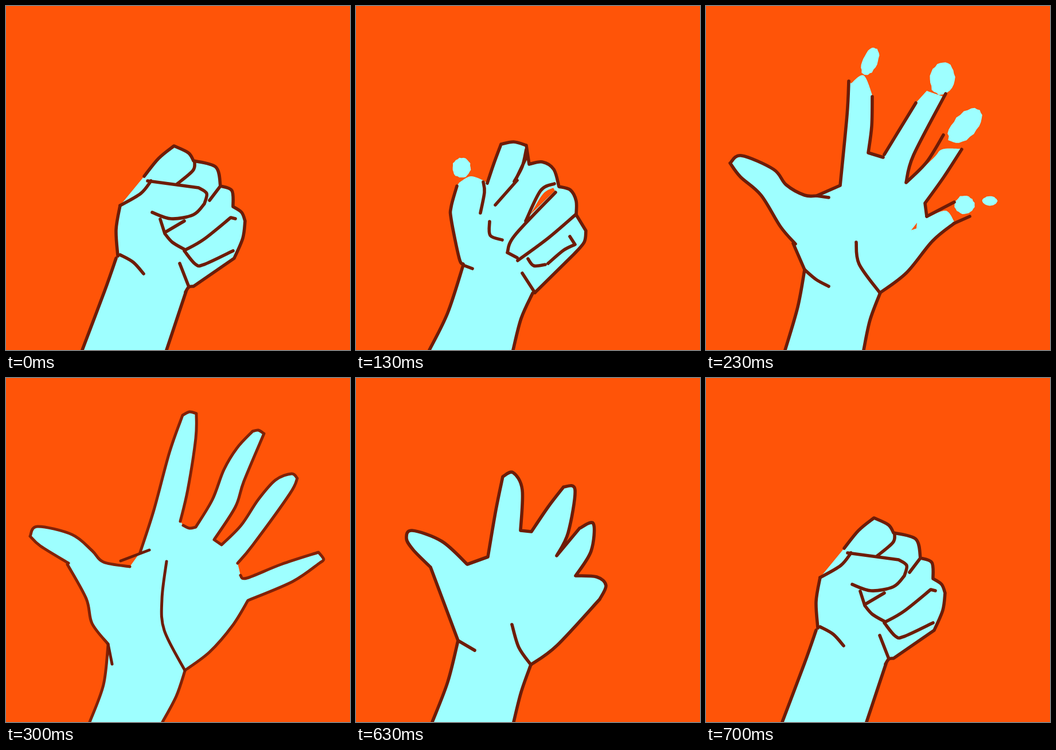
Recreate the animation shown at these times as an HTML page with a canvas. Size 600 by 600 pixels, loop 830 ms.

```html
<!DOCTYPE html>
<html lang="en">
<head>
<meta charset="utf-8">
<title>Opening hand</title>
<style>
  html, body { margin: 0; width: 100%; height: 100%; overflow: hidden; background: #ff5408; }
  canvas { display: block; width: 100vw; height: 100vh; }
</style>
</head>
<body>
<canvas id="stage" width="600" height="600"></canvas>
<script>
const ctx = document.getElementById('stage').getContext('2d');
const BACK = '#ff5408', SKIN = '#9effff', INK = '#6e1c07', SOFT_INK = '#822105';

// Adds a smooth curve through "x,y" points; "|" marks a sharp corner.
function addCurve(path, text, joined) {
  let last = null;
  for (const part of text.split('|')) {
    const pts = part.split(' ').map(p => p.split(',').map(Number));
    if (last) pts.unshift(last);
    else if (joined) path.lineTo(...pts[0]);
    else path.moveTo(...pts[0]);
    for (let i = 0; i < pts.length - 1; i++) {
      const a = pts[i], b = pts[i + 1];
      const before = pts[i - 1] || a, after = pts[i + 2] || b;
      path.bezierCurveTo(
        a[0] + (b[0] - before[0]) / 6, a[1] + (b[1] - before[1]) / 6,
        b[0] - (after[0] - a[0]) / 6, b[1] - (after[1] - a[1]) / 6,
        b[0], b[1]);
    }
    last = pts[pts.length - 1];
  }
}

function curves(list, joined) {
  const path = new Path2D();
  list.forEach((text, i) => addCurve(path, text, joined && i > 0));
  return path;
}

// A loose dab of skin colour with a slightly ragged rim.
function addDab(path, x, y, rx, ry, turn = 0) {
  let seed = x;
  const dab = new Path2D();
  for (let i = 0; i < 28; i++) {
    seed = (seed * 73 + 41) % 1009;
    const a = i / 28 * Math.PI * 2, r = 0.95 + seed / 1009 * 0.12;
    const u = Math.cos(a) * rx * r, v = Math.sin(a) * ry * r;
    dab.lineTo(x + u * Math.cos(turn) - v * Math.sin(turn),
               y + u * Math.sin(turn) + v * Math.cos(turn));
  }
  path.addPath(dab);
}

// The outline runs clockwise from the left of the arm and bounds the skin;
// "~" marks a stretch of it without ink.
function pose({ outline, creases, dabs = [], gap, ink = INK, width = 5.6 }) {
  const skin = curves(outline.map(s => s.replace('~', '')), true);
  dabs.forEach(d => addDab(skin, ...d));
  return {
    skin, ink, width,
    gap: curves(gap ? [gap] : []),
    outline: curves(outline.filter(s => s[0] !== '~')),
    creases: curves(creases)
  };
}

const fist = pose({
  outline: [
    '133,600 172,497 192,440', '195,436 192,390 199,348',
    '241,297 266,266 293,244|318,256 327,270|366,281 374,314|394,322 396,350|411,360 417,375|413,405 398,440|327,489|319,490 313,499',
    '314,498 300,540 280,600'
  ],
  creases: [
    '199,348 235,327 253,305', '247,305 336,317|350,327 346,345|327,364 288,371 255,360',
    '329,272 326,287 299,310', '374,314 355,339', '269,372 277,397|290,412 312,425',
    '277,395 311,375', '312,426 345,407 392,369|400,371', '311,427 330,450 345,451 396,427',
    '303,449 319,490', '199,434 222,447 240,467'
  ]
});

const loose = pose({
  outline: [
    '128,600 160,535 187,452', '187,450 180,440 166,372 166,350 176,314', '~180,308 200,297 222,304',
    '229,309 240,276 253,241|275,237 297,243|302,276|325,272 345,285 354,315|374,321 384,340 384,364|401,392|398,412 380,433|312,500',
    '308,501 288,545 274,600'
  ],
  creases: [
    '222,307 224,325 217,361', '297,250 290,280 276,306', '298,262 278,304', '281,304 243,347',
    '346,310 322,322 296,375', '348,325 277,400 264,430|281,439', '384,363 335,405 282,444',
    '373,402 382,416|362,426 335,449', '300,441 310,453 330,451', '233,376 234,400 255,408',
    '187,452 203,458', '290,466 312,500'
  ],
  dabs: [[184, 282, 16, 17]],
  gap: '344,317 326,328 304,364|347,322'
});

const half = pose({
  outline: [
    '133,600 160,530 178,458|130,330|100,300 88,280 98,266 150,285 194,325|230,312|244,230 256,172|274,165 290,195 287,266|306,268|335,225 362,190|382,195 370,270 350,310|390,262|414,254 410,302 383,345|420,347 436,362 425,386|350,467 305,500|288,548 275,600'
  ],
  creases: ['178,458 207,475', '272,430 284,470 305,500']
});

const spread = pose({
  outline: [
    '138,600 160,525 172,460|152,414',
    '156,415 130,385 96,330 60,298 42,274|62,261 118,285 140,312 172,330 193,331|234,313|246,190 249,131',
    '~253,135 275,121 291,158', '290,158 289,210 283,256|309,264', '311,259 336,218 366,169',
    '~385,148 414,158', '418,153 362,260 349,308', '~352,308 397,265 412,250 442,249',
    '446,250 415,298 382,344|385,367', '~386,369 418,357 433,376',
    '433,379 395,410 350,465 304,500', '304,500 286,548 275,600'
  ],
  creases: [
    '193,331 214,334', '350,307 385,272 414,225', '385,367 433,342', '460,367 433,379',
    '262,412 267,450 303,500', '172,460 192,477 214,489'
  ],
  dabs: [
    [286, 97, 13, 25, 0.4], [412, 126, 21, 28, 0.2], [452, 209, 20, 37, 0.75],
    [451, 347, 17, 16], [495, 340, 13, 8]
  ],
  gap: '358,391|368,378|367,388'
});

const open = pose({
  ink: SOFT_INK,
  width: 5,
  outline: [
    '146,600 170,535 178,466', '178,464 150,428 140,385 107,325',
    '109,323 60,293 42,276|55,259 115,273 150,301 170,321 216,329',
    '234,304 258,230 285,130 308,65|320,59 332,62|331,105 317,195 304,250',
    '309,257 320,262 331,260|360,212 380,160 403,122 430,93|440,91 450,97|415,180 400,225 363,282|376,291|410,257 440,212 470,178 498,167 508,175|495,202 430,292 404,323',
    '409,344 420,349 480,325 545,304|554,316 548,322|500,355 422,388|395,432 355,478 312,510',
    '312,511 297,555 273,600'
  ],
  creases: ['280,320 272,385 276,440 312,510', '200,319 250,300', '178,464 185,499']
});

const LOOP = 830;
const timeline = [
  [0, fist], [130, loose], [200, half], [230, spread], [300, open],
  [570, spread], [600, half], [670, loose], [700, fist]
];

function draw(p) {
  ctx.fillStyle = BACK;
  ctx.fillRect(0, 0, 600, 600);
  ctx.fillStyle = SKIN;
  ctx.fill(p.skin);
  ctx.fillStyle = BACK;
  ctx.fill(p.gap);
  ctx.lineCap = ctx.lineJoin = 'round';
  ctx.lineWidth = p.width;
  ctx.strokeStyle = p.ink;
  ctx.stroke(p.outline);
  ctx.strokeStyle = INK;
  ctx.stroke(p.creases);
}

const start = performance.now();
function tick() {
  const t = (performance.now() - start) % LOOP;
  draw(timeline.filter(([from]) => from <= t).pop()[1]);
  requestAnimationFrame(tick);
}
tick();
</script>
</body>
</html>
```
